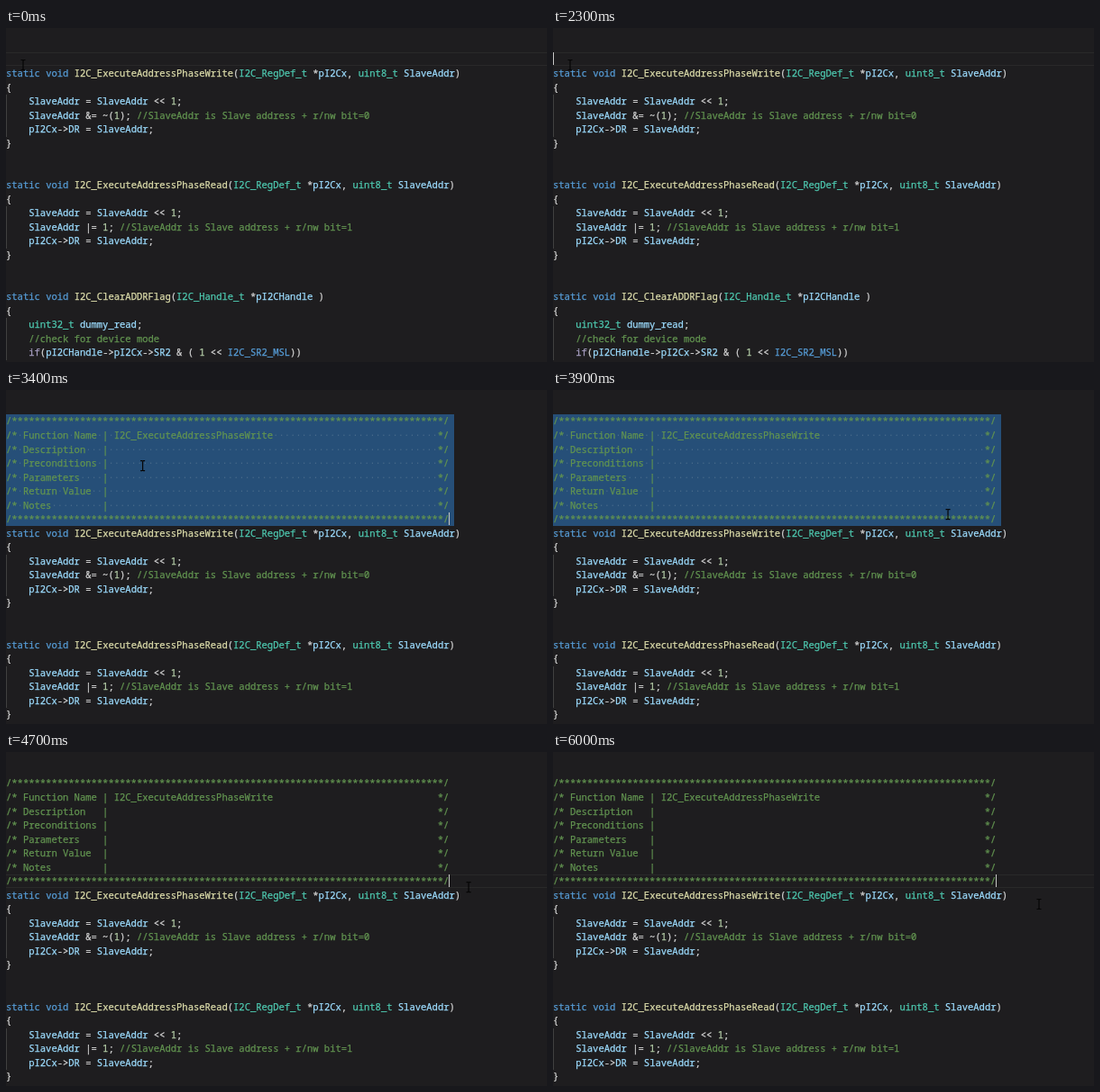
These frames come from a looping animation (600 px wide and 371 px high, 6100 ms). An HTML page:

```html
<!DOCTYPE html>
<html lang="en">
<head>
<meta charset="utf-8">
<style>
html, body { margin: 0; width: 100%; height: 100%; overflow: hidden; background: #1e1d1f; }
#stage { position: relative; width: 100%; height: 100%; overflow: clip; contain: strict; }
#editor {
  --row: 15.53px;
  position: absolute; left: 0; top: 26.9px; width: 600px;
  font: 10.5px/15.53px "Noto Sans Mono", monospace;
  font-variant-ligatures: none; color: #d4d4d4; white-space: pre;
}
#editor > * { position: absolute; left: 0; }
#text, #dots { top: .6px; }
#text { -webkit-text-stroke: .25px; }
#text div, #dots div { height: var(--row); }
.indent { box-shadow: inset 1px 0 #404040; }
#select { top: 0; width: 497px; height: calc(8 * var(--row)); background: #264f78; }
#dots { color: rgba(227, 228, 226, .2); }
#line { width: 600px; height: var(--row); box-sizing: border-box; border: solid #292929; border-width: 1px 0; }
#caret { width: 1.4px; height: 14.5px; background: #c8c9c7; }
#mouse { position: absolute; left: -4px; top: -7px; }
.comment { color: #629450; }
.type { color: #4ec9b0; }
.key, .macro { color: #569cd6; }
.flow { color: #a9a0c4; }
.func { color: #dcdcaa; }
.num { color: #b5cea8; }
.name { color: #9cdcfe; }
</style>
</head>
<body>
<div id="stage">
  <div id="editor">
    <div id="line"></div>
    <div id="select"></div>
    <div id="dots"></div>
    <div id="text"></div>
    <div id="caret"></div>
  </div>
  <svg id="mouse" width="8" height="14" fill="none" stroke="#050505" stroke-width="1.2">
    <path d="M1.5 1.5H3.2L4 2.2L4.8 1.5H6.5M4 2V12M1.5 12.5H3.2L4 11.8L4.8 12.5H6.5"/>
  </svg>
</div>
<script>
const LOOP = 6100, INSERT = 2400, DESELECT = 4700, ROW = 15.53;
const $ = id => document.getElementById(id);

const phase = (name, op, bit) => `static void I2C_ExecuteAddressPhase${name}(I2C_RegDef_t *pI2Cx, uint8_t SlaveAddr)
{
    SlaveAddr = SlaveAddr << 1;
    SlaveAddr ${op}; //SlaveAddr is Slave address + r/nw bit=${bit}
    pI2Cx->DR = SlaveAddr;
}


`;
const code = (phase('Write', '&= ~(1)', 0) + phase('Read', '|= 1', 1) +
`static void I2C_ClearADDRFlag(I2C_Handle_t *pI2CHandle )
{
    uint32_t dummy_read;
    //check for device mode
    if(pI2CHandle->pI2Cx->SR2 & ( 1 << I2C_SR2_MSL))`).split('\n');

const rule = '/' + '*'.repeat(76) + '/';
const fields = ['Function Name', 'Description', 'Preconditions', 'Parameters', 'Return Value', 'Notes'];
const banner = [rule, ...fields.map((field, i) =>
  ('/* ' + field.padEnd(14) + '| ' + (i ? '' : 'I2C_ExecuteAddressPhaseWrite')).padEnd(76) + '*/'), rule];

const kinds = {
  comment: /\/[*/].*/,
  type: /\b\w+_t\b/,
  key: /\b(?:static|void)\b/,
  flow: /\bif\b/,
  func: /\bI2C_\w+(?=\()/,
  macro: /\bI2C_SR\w+/,
  num: /\b\d+\b/,
  name: /\b[A-Za-z]\w*/
};
const lexer = new RegExp(Object.entries(kinds).map(([k, r]) => `(?<${k}>${r.source})`).join('|'), 'g');

function add(parent, tag, text, cls = '') {
  const el = document.createElement(tag);
  el.textContent = text;
  el.className = cls;
  parent.append(el);
  return el;
}

function addLine(line) {
  const row = add($('text'), 'div', '', line.startsWith('    ') ? 'indent' : '');
  let end = 0;
  for (const m of line.matchAll(lexer)) {
    row.append(line.slice(end, m.index));
    add(row, 'span', m[0], Object.keys(kinds).find(k => m.groups[k]));
    end = m.index + m[0].length;
  }
  row.append(line.slice(end));
}

function showLines(inserted) {
  $('text').replaceChildren();
  const lines = [...(inserted ? banner : ['']), ...code];
  lines.slice(0, 22).forEach(addLine);
}

for (const line of banner) add($('dots'), 'div', line.replace(/./g, c => c === ' ' ? '·' : ' '));

// time, x, y
const path = [
  [0, 19, 41], [3100, 19, 41], [3400, 151, 84], [3800, 400, 132], [4100, 513, 150],
  [4700, 513, 150], [5000, 534, 165], [5300, 539, 169], [LOOP, 539, 169]
];
function mouseAt(t) {
  const i = path.findIndex(p => p[0] > t);
  const [t0, x0, y0] = path[i - 1], [t1, x1, y1] = path[i];
  const k = (t - t0) / (t1 - t0);
  return [x0 + (x1 - x0) * k, y0 + (y1 - y0) * k];
}

const blink = age => Math.floor(age / 500) % 2 === 0;
let shown;

function frame() {
  const t = performance.now() % LOOP;
  const inserted = t >= INSERT, selected = inserted && t < DESELECT;
  if (inserted !== shown) showLines(shown = inserted);

  $('select').hidden = $('dots').hidden = !selected;
  $('line').hidden = selected;
  const top = (inserted ? 7 * ROW : 0) + 'px';
  $('line').style.top = $('caret').style.top = top;
  $('caret').style.left = (inserted ? 490.5 : 0) + 'px';
  $('caret').hidden = !blink(t - (selected ? INSERT : inserted ? DESELECT : 300));

  const [x, y] = mouseAt(t);
  $('mouse').style.transform = `translate(${x}px, ${y}px)`;
  requestAnimationFrame(frame);
}
frame();
</script>
</body>
</html>
```
